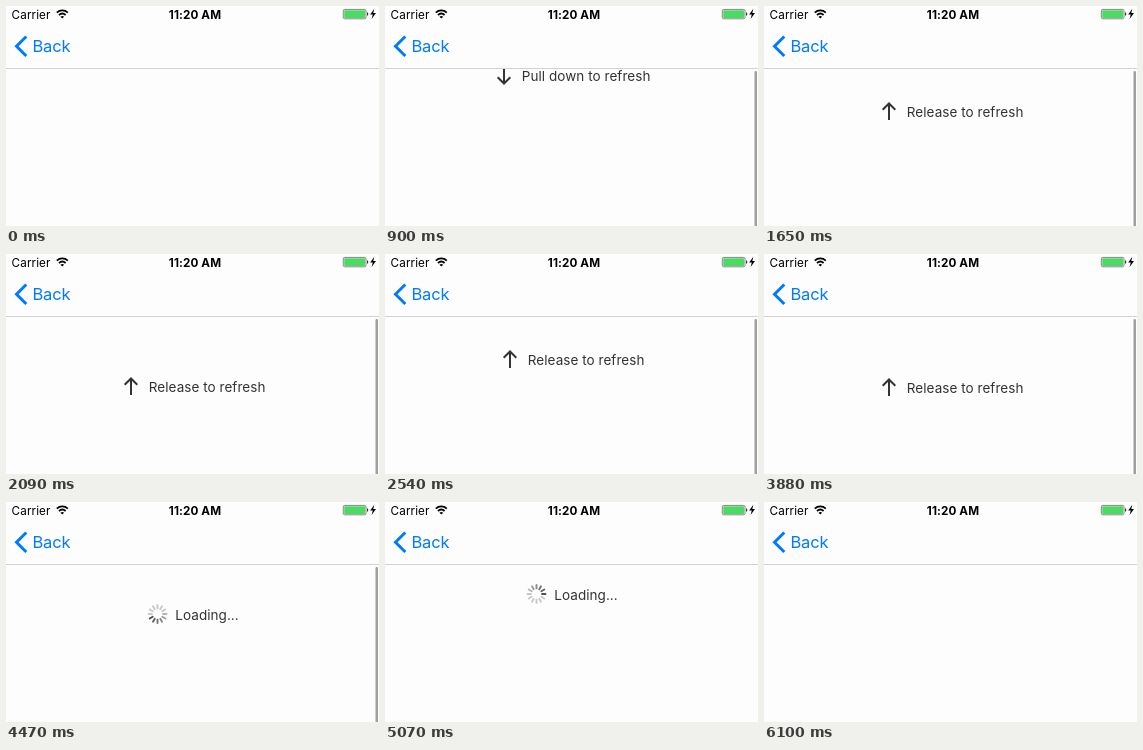
An HTML page for the animation above (6.84 s loop, 373x220 px).

```html
<!DOCTYPE html>
<html lang="en">
<head>
<meta charset="utf-8">
<title>Pull to refresh</title>
<style>
html, body { margin: 0; width: 100%; height: 100%; overflow: hidden; background: #fdfdfd; }
svg { display: block; width: 373px; height: 220px; font-family: Inter, "Noto Sans", sans-serif; }
.status { font-size: 11.7px; letter-spacing: .1px; }
.time { font-size: 11.7px; font-weight: 700; letter-spacing: .1px; }
.back { font-size: 16.5px; letter-spacing: -.2px; fill: #007aff; }
.row text { font-size: 13.5px; letter-spacing: .05px; fill: #333; }
.arrow { fill: none; stroke: #333; stroke-width: 2; }
</style>
</head>
<body>
<svg viewBox="0 0 373 220">
  <defs>
    <clipPath id="content"><rect y="62" width="373" height="158"/></clipPath>
  </defs>
  <rect width="373" height="220" fill="#fdfdfd"/>

  <g clip-path="url(#content)">
    <g id="pull" class="row">
      <path class="arrow" d="M119-8V8.5M112.7 2.2L119 8.5L125.3 2.2"/>
      <text x="136.8" y="5.5">Pull down to refresh</text>
    </g>
    <g id="release" class="row">
      <path class="arrow" d="M125 9V-7.5M118.7-1.2L125-7.5L131.3-1.2"/>
      <text x="142.8" y="5.5">Release to refresh</text>
    </g>
    <g id="loading" class="row">
      <g id="spinner" transform="translate(151.5 0)" stroke="#444" stroke-width="1.9" stroke-linecap="round"></g>
      <text x="169.3" y="5.5">Loading...</text>
    </g>
  </g>
  <rect id="scrollbar" x="369.5" y="65" width="2.5" height="170" rx="1.25" fill="#a0a0a0"/>

  <rect y="62" width="373" height="1" fill="#d2d2d2"/>
  <path d="M20.3 30.5L10.5 40.2L20.3 50" fill="none" stroke="#007aff" stroke-width="3"/>
  <text class="back" x="26.5" y="46">Back</text>

  <text class="status" x="5.6" y="12.6">Carrier</text>
  <g fill="none" stroke="#000" stroke-width="1.8">
    <path d="M50.8 6.6A8 8 0 0 1 61.8 6.6"/>
    <path d="M53 9A5 5 0 0 1 59.6 9"/>
    <path d="M56.3 12.6L54.5 10.8A2.6 2.6 0 0 1 58.1 10.8Z" fill="#000" stroke="none"/>
  </g>
  <text class="time" x="189" y="12.6" text-anchor="middle">11:20 AM</text>
  <rect x="337.3" y="3.4" width="22.7" height="9.4" rx="1.5" fill="none" stroke="#555" stroke-width=".7"/>
  <rect x="338.2" y="4.3" width="20.9" height="7.6" rx=".6" fill="#4cd964"/>
  <path d="M361 6.3Q362.3 6.5 362.3 8T361 9.7Z" fill="#333"/>
  <path d="M368.3 2.8L364.2 8.5H366.8L365.6 13L370 7.1H367.3Z"/>
</svg>
<script>
const LOOP = 6840;
const STEP = 148.6; // the picture advances in even steps
const DRAG_START = 750, LOAD_START = 4465, LOAD_END = 6100;
const REST = 92; // row centre once the list is held open
const BLADES = 12;

const sineInOut = f => (1 - Math.cos(Math.PI * f)) / 2;
const quadOut = f => 1 - (1 - f) ** 2;
const cubicInOut = f => f < .5 ? 4 * f ** 3 : 1 - 4 * (1 - f) ** 3;
const clamp = v => Math.min(1, Math.max(0, v));

// Turning points of the finger; each is reached with its own easing.
const drag = [
  { at: 750, y: 66 },
  { at: 960, y: 70, ease: sineInOut },
  { at: 2240, y: 134, ease: sineInOut },
  { at: 3180, y: 78, ease: quadOut },
  { at: 4200, y: 142, ease: cubicInOut }
];

const $ = id => document.getElementById(id);
const [pull, release, loading, spinner, scrollbar] =
  ["pull", "release", "loading", "spinner", "scrollbar"].map($);

const blades = Array.from({ length: BLADES }, (_, i) => {
  const line = document.createElementNS("http://www.w3.org/2000/svg", "line");
  line.setAttribute("y1", -5.6);
  line.setAttribute("y2", -9);
  line.setAttribute("transform", `rotate(${i * 360 / BLADES})`);
  return spinner.appendChild(line);
});

function dragY(t) {
  return drag.slice(1).reduce((y, key, i) => {
    const from = drag[i];
    return y + (key.y - from.y) * key.ease(clamp((t - from.at) / (key.at - from.at)));
  }, drag[0].y);
}

// Springs back to rest, then starts to slide away.
function loadY(t) {
  return REST + 20 * Math.exp((LOAD_START - t) / 120) - 8 * clamp((t - 5810) / 140);
}

function place(row, visible, y) {
  row.style.display = visible ? "" : "none";
  row.setAttribute("transform", `translate(0 ${Math.round(y)})`);
}

function draw(time) {
  const t = DRAG_START + STEP * Math.floor((time - DRAG_START) / STEP);
  const dragging = time >= DRAG_START && time < LOAD_START;
  const y = dragY(t);
  place(pull, dragging && y < REST, y);
  place(release, dragging && y >= REST, y);
  place(loading, time >= LOAD_START && time < LOAD_END, loadY(t));
  scrollbar.setAttribute("opacity", time < DRAG_START ? 0 : clamp((4910 - t) / 440));

  const head = 8 + Math.floor((t - LOAD_START) * BLADES / 1000);
  blades.forEach((blade, i) => {
    const age = ((head - i) % BLADES + BLADES) % BLADES;
    blade.setAttribute("opacity", Math.max(.28, .95 - age * .11));
  });
}

const start = performance.now();
function tick() {
  draw((performance.now() - start) % LOOP);
  requestAnimationFrame(tick);
}
tick();
</script>
</body>
</html>
```
